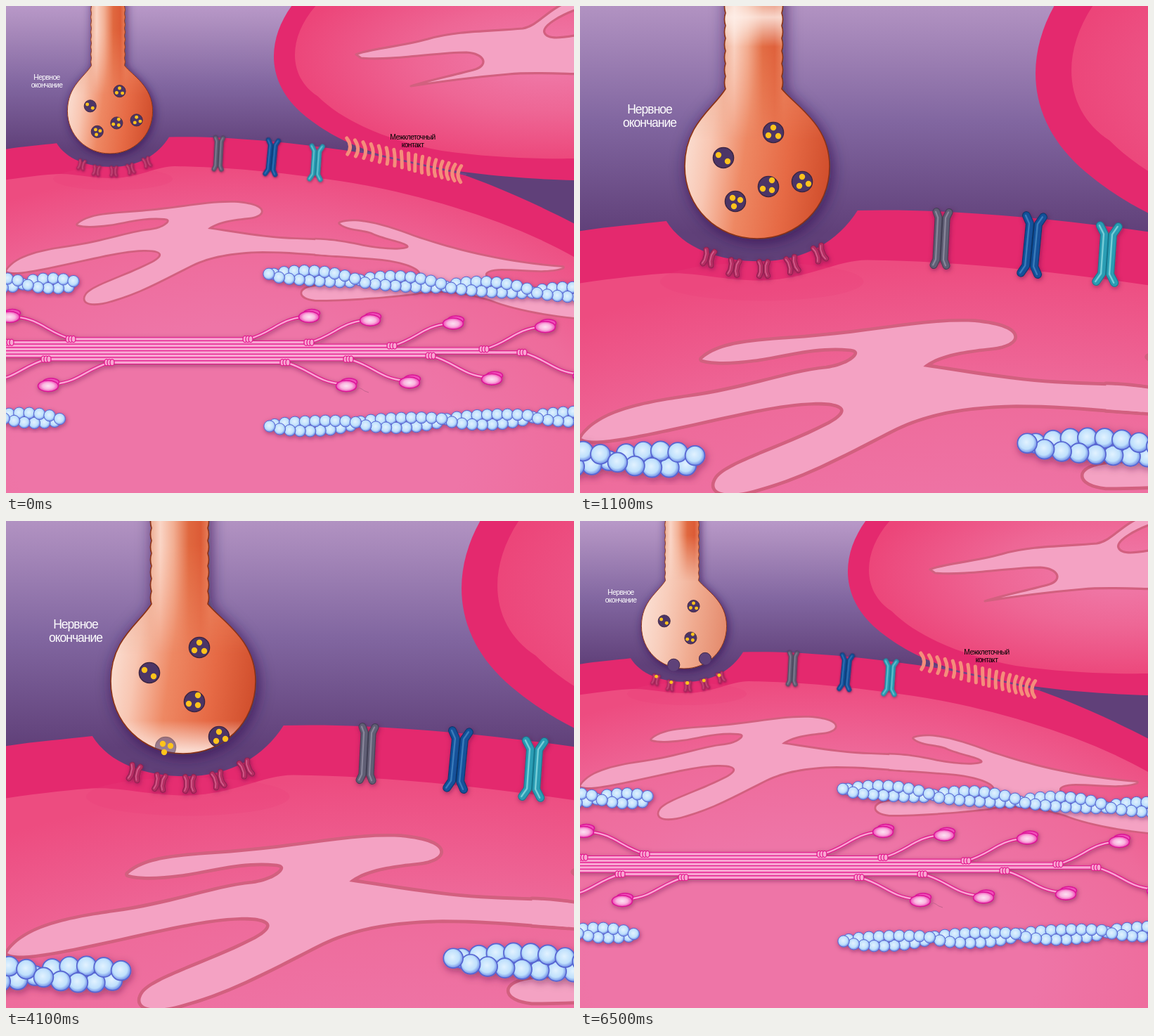
Animation of 808x693 px, one loop 6700 ms. Source, as an HTML page:

```html
<!DOCTYPE html>
<html lang="ru">
<head>
<meta charset="utf-8">
<title>Нервное окончание</title>
<style>
html, body { margin: 0; width: 100%; height: 100%; overflow: hidden; background: #ee74a7; }
svg { display: block; width: 100vw; height: 100vh; }
text { font-family: "Arial Narrow", "Liberation Sans", Arial, sans-serif; text-anchor: middle; }
</style>
</head>
<body>
<svg viewBox="0 0 808 693" preserveAspectRatio="none">
<defs>
  <linearGradient id="sky" gradientUnits="userSpaceOnUse" x1="0" y1="0" x2="0" y2="205">
    <stop offset="0" stop-color="#b898c8"/><stop offset=".1" stop-color="#af90c0"/>
    <stop offset=".55" stop-color="#8166a0"/><stop offset="1" stop-color="#604079"/>
  </linearGradient>
  <radialGradient id="plasma" gradientUnits="userSpaceOnUse" cx="0" cy="0" r="1" gradientTransform="translate(330 640) scale(710 410)">
    <stop offset=".45" stop-color="#ee75a7"/><stop offset=".74" stop-color="#ee6b9b"/><stop offset="1" stop-color="#ed4c80"/>
  </radialGradient>
  <radialGradient id="plasma2" gradientUnits="userSpaceOnUse" cx="0" cy="0" r="1" gradientTransform="translate(770 75) scale(365 150)">
    <stop offset="0" stop-color="#f07dac"/><stop offset=".5" stop-color="#ee6695"/><stop offset="1" stop-color="#ec4579"/>
  </radialGradient>
  <linearGradient id="bulbFill" gradientUnits="userSpaceOnUse" x1="149" y1="215" x2="355" y2="245">
    <stop offset="0" stop-color="#fadccf"/><stop offset=".16" stop-color="#f8c6b2"/><stop offset=".4" stop-color="#ee8863"/>
    <stop offset=".7" stop-color="#e66a45"/><stop offset="1" stop-color="#d04e2c"/>
  </linearGradient>
  <linearGradient id="paleFill" gradientUnits="userSpaceOnUse" x1="149" y1="215" x2="355" y2="245">
    <stop offset="0" stop-color="#fbdfd3"/><stop offset=".25" stop-color="#f8cdbb"/>
    <stop offset=".6" stop-color="#f0ab90"/><stop offset="1" stop-color="#e48a6c"/>
  </linearGradient>
  <linearGradient id="stemFill" gradientUnits="userSpaceOnUse" x1="204" y1="0" x2="290" y2="0">
    <stop offset="0" stop-color="#eba98e"/><stop offset=".18" stop-color="#fad5c6"/><stop offset=".4" stop-color="#f2ae92"/>
    <stop offset=".65" stop-color="#e0683f"/><stop offset=".85" stop-color="#dc5b36"/><stop offset="1" stop-color="#e98560"/>
  </linearGradient>
  <linearGradient id="fade" x1="0" y1="0" x2="0" y2="1">
    <stop offset=".35" stop-color="#fff"/><stop offset="1" stop-color="#000"/>
  </linearGradient>
  <linearGradient id="pulseFill" x1="0" y1="0" x2="0" y2="1">
    <stop offset="0" stop-color="#fff" stop-opacity="0"/><stop offset=".5" stop-color="#fff3ee" stop-opacity=".8"/>
    <stop offset="1" stop-color="#fff" stop-opacity="0"/>
  </linearGradient>
  <radialGradient id="ball" cx=".46" cy=".44" r=".56">
    <stop offset="0" stop-color="#e2f2ff"/><stop offset=".65" stop-color="#bfe0fc"/><stop offset="1" stop-color="#6d8be6"/>
  </radialGradient>
  <radialGradient id="headFill">
    <stop offset="0" stop-color="#fde0f2"/><stop offset=".55" stop-color="#fab4df"/><stop offset="1" stop-color="#ee45b4"/>
  </radialGradient>
  <mask id="stemMask" maskUnits="userSpaceOnUse" x="140" y="-50" width="230" height="400">
    <rect id="stemFade" x="140" y="-50" width="230" height="240" fill="url(#fade)"/>
  </mask>
  <clipPath id="inBulb"><path class="bulb"/></clipPath>
  <filter id="soft" x="-20%" y="-20%" width="140%" height="140%">
    <feDropShadow dx="1" dy="2" stdDeviation="3" flood-color="#5a1040" flood-opacity=".5"/>
  </filter>
  <filter id="glow" x="-20%" y="-20%" width="140%" height="140%">
    <feDropShadow dx="3" dy="3" stdDeviation="11" flood-color="#2c1848" flood-opacity=".75"/>
  </filter>
</defs>

<g id="cam">
  <rect x="-5" y="-5" width="825" height="400" fill="url(#sky)"/>
  <path fill="#e4296e" d="M410-5C371 45 369 105 418 150C450 178 490 202 570 222C640 238 740 247 815 248V-5Z"/>
  <path fill="url(#plasma2)" d="M445-5C400 42 400 100 443 128C480 165 545 192 620 206C690 216 760 218 815 217V-5Z"/>
  <path fill="#f4a2c3" stroke="#d2607f" stroke-width="3.2" stroke-linejoin="round" d="M498 69C510 62 560 58 600 47C640 35 690 36 735 32C757 28 770 5 800-6H820V2C790 12 762 28 766 38C770 48 790 46 820 40V97C780 96 745 94 715 97C680 100 640 104 576 114C600 106 640 98 668 90C686 84 682 68 655 66C610 66 550 78 505 74Z"/>
  <path fill="#e4296e" d="M-5 204.500C20 200 50 198 72 195.300C86 218 116 229 150 229C188 229 216 212 232 186.500C300 184.500 390 192 480 205C545 214 600 226 650 240C705 259 765 287 815 313V700H-5Z"/>
  <path fill="url(#plasma)" d="M-5 248C30 243 55 240 75 239C95 238 120 245 153 245C190 244 215 228 240 228C320 229 400 238 475 249C580 265 720 305 815 361V700H-5Z"/>
  <ellipse cx="152" cy="246" rx="85" ry="16" fill="#e83f77" opacity=".25"/>
  <path d="M497 205L560 219L655 240" fill="none" stroke="#6f4388" stroke-width="2.500"/>

  <g id="er"></g>
  <g id="fibres"></g>
  <g id="joint" fill="none" stroke="#f58d7b" stroke-width="5" stroke-linecap="round"></g>
  <g font-size="10.300" letter-spacing="-.590">
    <text x="578.500" y="190">Межклеточный</text>
    <text x="578.500" y="201">контакт</text>
  </g>

  <g transform="scale(.58824) translate(-.4 26)">
    <g id="channels" filter="url(#soft)"></g>
    <path class="bulb" fill="#c8603f" filter="url(#glow)"/>
    <path class="bulb" id="body"/>
    <path class="bulb" fill="url(#stemFill)" mask="url(#stemMask)"/>
    <g clip-path="url(#inBulb)">
      <rect id="pulse" x="140" width="230" height="84" fill="url(#pulseFill)"/>
    </g>
    <path class="bulb" fill="none" stroke="#8a3216" stroke-width="1.600"/>
    <g id="rest"></g>
    <g id="pits" fill="#5f4279"><circle cx="303" cy="307" r="15"/><circle cx="227" cy="322" r="15"/></g>
    <g id="discs" clip-path="url(#inBulb)"></g>
    <g id="dots" fill="#ffc31c"></g>
    <g fill="#fff" font-size="17.500" letter-spacing="-1">
      <text x="99" y="153">Нервное</text>
      <text x="99" y="172">окончание</text>
    </g>
  </g>
</g>
</svg>

<script>
const $ = id => document.getElementById(id);
const put = (id, s) => $(id).insertAdjacentHTML('beforeend', s);
const circle = (x, y, r, more = '') => `<circle cx="${x}" cy="${y}" r="${r}" ${more}/>`;

// nerve outline with a rippled stem
const outline = 'M207 118' + 'q-3 -9 0 -18'.repeat(9) + 'H287' + 'q3 9 0 18'.repeat(9) +
  'C306 142 355 168 355 228C355 287 309 331 252 331C195 331 149 287 149 228C149 168 190 146 207 118Z';
document.querySelectorAll('.bulb').forEach(p => p.setAttribute('d', outline));

// reticulum: two overlapping pieces, rims first
const reticulum = [
  'M1 377C15 355 55 348 90 343C140 336 175 322 206 319C228 316 240 303 225 302C195 299 165 309 145 311C130 313 112 314 102 311' +
  'C120 294 165 296 200 292C250 288 290 278 330 280C372 284 370 298 345 301C315 304 298 308 287 317C320 322 350 327 380 330' +
  'C410 333 440 332 470 335V355C430 352 400 349 365 349C320 350 290 356 265 368C225 388 190 408 150 419C125 427 105 424 115 410' +
  'C125 398 170 385 205 367C228 356 225 346 195 347C160 348 110 362 60 372C35 377 8 382 1 377Z',
  'M440 332.500C460 333 480 336 495 339C520 345 560 350 572 344C578 336 540 332 520 322C505 317 485 318 475 309C500 300 545 315 580 328' +
  'C630 345 700 365 792 372C770 380 735 374 705 374C675 374 675 388 700 393C740 402 780 405 820 412V444C770 440 720 430 690 418' +
  'C650 405 610 402 580 409C540 414 480 418 440 418C415 415 415 402 440 399C490 395 560 392 586 386C600 376 570 364 535 360' +
  'C500 357 470 355 440 353Z'
];
for (const style of ['fill="none" stroke="#d2607f" stroke-width="5.5" stroke-linejoin="round"', 'fill="#f4a2c3"'])
  for (const d of reticulum) put('er', `<path d="${d}" ${style}/>`);

// two twisted rows of beads that cross at regular nodes
function beads(x1, x2, node, len, y1, slope, bow) {
  const list = [];
  for (let x = x1, row = 1; x <= x2; x += 7.2, row = -row) {
    const a = Math.PI * (x - node) / len, wave = Math.sin(a);
    const y = y1 + (x - x1) * slope + bow * Math.abs(wave) + row * 7 * Math.sign(wave) * Math.abs(wave) ** .6;
    list.push({ x, y, z: row * Math.cos(a) });
  }
  list.sort((a, b) => a.z - b.z);
  put('fibres', '<g filter="url(#soft)">' + list.map(({ x, y }) =>
    circle(x.toFixed(1), y.toFixed(1), 8.2, 'fill="url(#ball)" stroke="#5765d2" stroke-width="1"')).join('') + '</g>');
}
beads(-12, 99, 26, 78, 394, .01, 0);
beads(374, 820, 377, 125, 383, .063, -3);
beads(-10, 77, 77, 85, 584, .05, 0);
beads(375, 820, 375, 125, 598, -.036, 2);

// thick filament
const line = (d, wide, thin) => `<path d="${d}" fill="none" stroke="#e3158c" stroke-width="${wide}"/>` +
  `<path d="${d}" fill="none" stroke="#f9a6d2" stroke-width="${thin}"/>`;
const knot = (x, y) => [-5, -1, 3].map(k =>
  `<ellipse cx="${x + k}" cy="${y}" rx="3" ry="4.6" fill="#f9a6d2" stroke="#e3158c" stroke-width="1.3"/>`).join('');
const head = (x, y) => '<g stroke="#dc1397" stroke-width="1.6">' +
  `<ellipse cx="${x + 3}" cy="${y - 4}" rx="11.500" ry="5.500" fill="#f04fb9"/>` +
  `<ellipse cx="${x - 1}" cy="${y + 1.500}" rx="14.500" ry="8" fill="url(#headFill)"/></g>`;
function arm(x, y, side, up) {
  const dx = 87 * side, dy = up ? -33 : 32;
  return line(`M${x} ${y}C${x + dx * .4} ${y + dy * .3} ${x + dx * .5} ${y + dy * .85} ${x + dx * .9} ${y + dy * .95}`, 4.6, 2.4) +
    head(x + dx, y + dy);
}
let thick = '', ends = '';
[[93, 345], [5, 432], [-20, 550], [-20, 681], [-20, 735], [-20, 605], [58, 488], [148, 398]].forEach(([x1, x2], i) => {
  const y = 474 + i * 4.75;
  thick += line(`M${x1} ${y}H${x2}`, 5.4, 3.5);
  for (const [x, side] of [[x1, -1], [x2, 1]])
    if (x > 0) ends += arm(x, y, side, i < 4) + knot(x, y);
});
put('fibres', `<g filter="url(#soft)">${thick + ends}</g><path d="M499 545q4-3 7 0t10 5" fill="none" stroke="#c4648f"/>`);

// cell contact, bars crowd to the right
for (let i = 0; i < 17; i++) {
  const bend = 9 * (1 - i / 8), x = 487 + i * 11.5 - i * i * .1, y = 199 + (x - 487) * .25;
  put('joint', `<path d="M${x - bend / 4} ${y - 11}q${bend} 12 ${i < 9 ? 1 : -1} 23"/>`);
}

// paired membrane proteins
function pair(x, y, turn, w, h, width, [edge, main, shine]) {
  const n = width * .5, k = h - w * .9;
  const d = [-1, 1].map(s => `M${s * w} ${-h}L${s * n} ${-k}V${k}L${s * w} ${h}`).join('');
  const layer = (c, sw, dx) => `<path d="${d}" stroke="${c}" stroke-width="${sw}" transform="translate(${dx})"/>`;
  put('channels', `<g transform="translate(${x} ${y}) rotate(${turn})" fill="none" stroke-linecap="round" stroke-linejoin="round">` +
    layer(edge, width, 0) + layer(main, width - 2, 0) + layer(shine, width * .2, -1) + '</g>');
}
pair(514, 331, 3, 9, 38, 11, ['#403e52', '#605e74', '#8a889c']);
pair(643, 340, 5.5, 12, 41, 12, ['#0c3568', '#12519a', '#3b7cbc']);
pair(750, 353, 4, 13, 40, 12, ['#14758c', '#2a9db4', '#79cfd9']);
[[183, 358, 14], [219, 372, 10], [261, 374, 0], [302, 368, -16], [341, 352, -20]]
  .forEach(([x, y, a]) => pair(x, y, a, 6, 10, 8, ['#8d2150', '#b52f63', '#d4608d']));

// vesicles
const disc = (x, y) => circle(x, y, 14.6, 'fill="#4c3566" stroke="#3a2440" stroke-width="1.400"');
[[204, 216, [[-7, -4], [6, 5]]], [275, 180, [[0, -7], [-7, 4], [7, 5]]], [268, 257, [[5, -9], [-8, 3], [5, 5]]]]
  .forEach(([x, y, spots]) => put('rest', disc(x, y) +
    spots.map(([dx, dy]) => circle(x + dx, y + dy, 4.2, 'fill="#ffc31c"')).join('')));

// [owner, offset x, offset y, receptor x, receptor y]
const grains = [
  [0, 0, -7, 300, 360], [0, -4, 6, 260, 366], [0, 9, 3, 337, 347],
  [1, -4, -5, 185, 350], [1, 7, -2, 260, 366], [1, -2, 7, 221, 364]
];
put('discs', disc(0, 0) + disc(0, 0));
put('dots', grains.map(() => circle(0, 0, 4.2)).join(''));
const discs = [...$('discs').children], dots = [...$('dots').children];

const views = ['translate(0 0) scale(1)', 'translate(.5 -19.3) scale(1.255)', 'translate(.4 -26) scale(1.7)'];
const home = [316, 250, 221, 278], dock = [303, 307, 227, 322];
// start, view, pulse height, vesicle places, release share
const steps = [
  [0, 0, null, home], [200, 1, null, home], [400, 2, null, home],
  [1100, 2, 16, home], [1600, 2, 76, home], [2100, 2, 136, home], [2600, 2, 196, home],
  [3100, 2, 258, [313, 260, 222, 291]], [3600, 2, 292, [309, 284, 224, 307]], [4100, 2, 326, dock],
  [4600, 2, null, dock, .35], [5100, 2, null, dock, .7], [5600, 2, null, dock, 1],
  [6300, 1, null, dock, 1], [6500, 0, null, dock, 1]
];
const set = (el, o) => { for (const k in o) el.setAttribute(k, o[k]); };
const show = (el, on) => set(el, { visibility: on ? 'visible' : 'hidden' });

function draw([, view, pulse, at, share]) {
  const open = share !== undefined;
  set($('cam'), { transform: views[view] });
  show($('pulse'), pulse !== null);
  set($('pulse'), { y: (pulse || 0) - 42 });
  set($('body'), { fill: open ? 'url(#paleFill)' : 'url(#bulbFill)' });
  set($('stemFade'), { height: open ? 170 : 240 });
  show($('pits'), open);
  discs.forEach((d, i) => {
    const [x, y] = at.slice(2 * i);
    const lit = pulse !== null && Math.abs(y - pulse) < 6;
    set(d, { cx: x, cy: y, fill: open ? 'none' : '#4c3566', opacity: lit ? .55 : 1 });
  });
  grains.forEach(([v, dx, dy, tx, ty], i) => {
    const x = at[2 * v] + dx, y = at[2 * v + 1] + dy, p = share || 0;
    set(dots[i], { cx: x + (tx - x) * p, cy: y + (ty - y) * p });
  });
}

const t0 = performance.now();
let last = null;
function tick() {
  const t = (performance.now() - t0) % 6700;
  const step = steps.findLast(s => s[0] <= t) || steps[0];
  if (step !== last) draw(last = step);
  requestAnimationFrame(tick);
}
tick();
</script>
</body>
</html>
```
